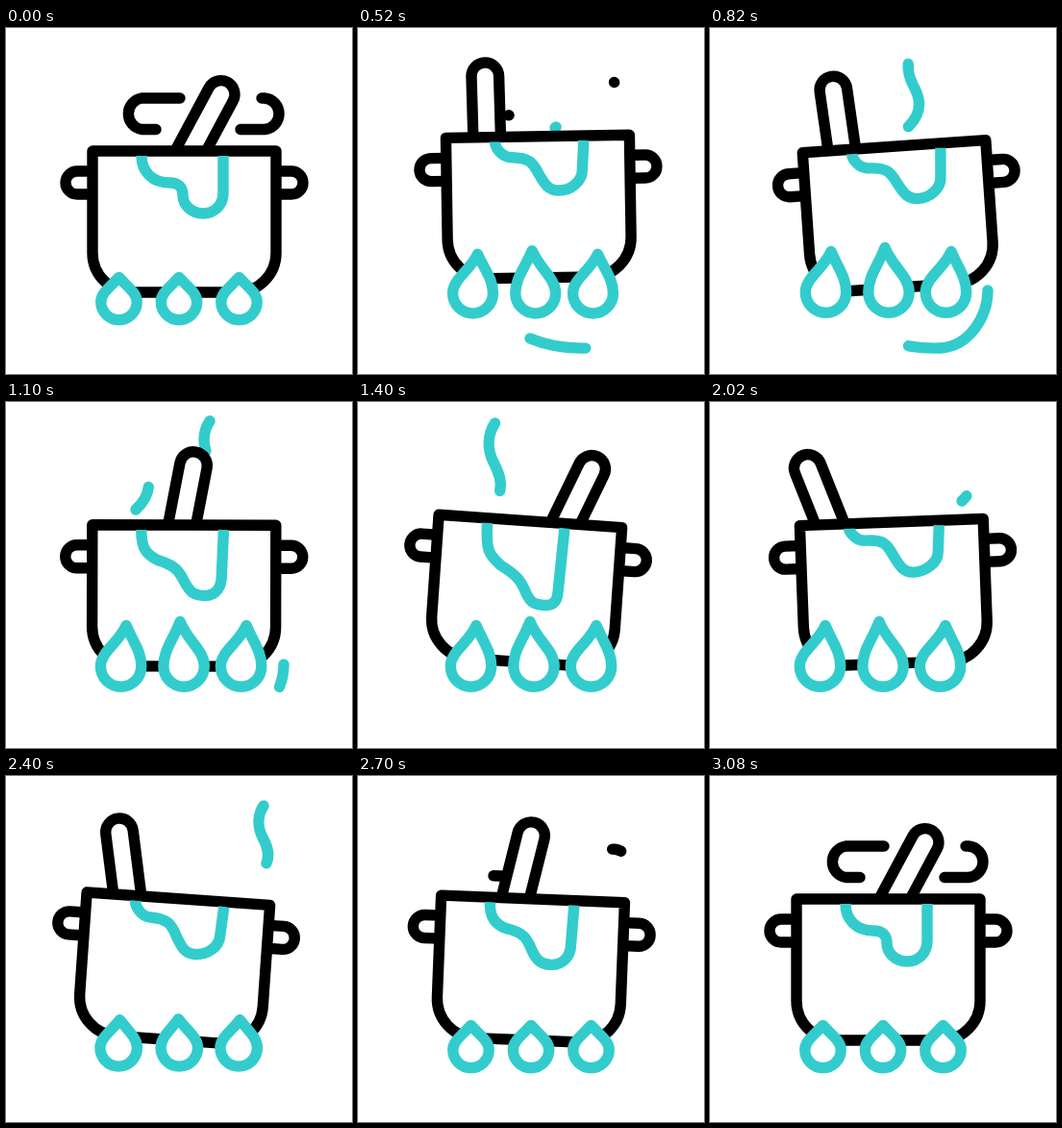
An HTML page for the animation above (3120 ms loop, 360 by 360 pixels).

```html
<!DOCTYPE html>
<html lang="en">
<head>
<meta charset="utf-8">
<title>Cooking pot</title>
<style>
  html, body { margin: 0; width: 100%; height: 100%; overflow: hidden; background: #fff; }
  svg { display: block; width: 100vw; height: 100vh; }
  path { fill: none; stroke: #000; stroke-width: 11.4; stroke-linejoin: round; stroke-linecap: round; }
  .teal { stroke: #33cccc; }
  .solid { fill: #fff; }
  #drip { stroke-linecap: butt; }
</style>
</head>
<body>
<svg viewBox="0 0 360 360">
  <g id="wisps"></g>
  <g id="pot">
    <path id="steamLeft" pathLength="100" d="M156 105.5H141a16.5 16.5 0 0 1 0-32.5H181"/>
    <path id="steamRight" pathLength="100" d="M266 73h3a16.3 16.3 0 0 1 0 32.5H244"/>
    <path id="spoon" class="solid"/>
    <path d="M90 149H74a12 12 0 0 0 0 24H90M281 149h16a12 12 0 0 1 0 24H281"/>
    <path class="solid" d="M90 128H281V234a41 41 0 0 1-41 41H131a41 41 0 0 1-41-41Z"/>
    <path id="drip" class="teal"/>
  </g>
  <g id="flames"></g>
</svg>
<script>
const LOOP = 3120;
const $ = id => document.getElementById(id);
const clamp = v => Math.min(1, Math.max(0, v));
const smooth = v => (v = clamp(v)) * v * (3 - 2 * v);
const ramp = (t, from, to) => smooth((t - from) / (to - from));

// Smooth swing through [time, value] turning points
const swing = (t, [first, ...rest]) => {
  let [time, value] = first;
  for (const [nextTime, nextValue] of rest) {
    value += (nextValue - value) * ramp(t, time, nextTime);
    if (t < nextTime) break;
    time = nextTime;
  }
  return value;
};

const TILT = [[400, 0], [790, -4], [1400, 4], [1820, -4.5], [2400, 4], [3060, 0]];
const SPOON_X = [[200, 192], [650, 118], [1420, 222], [2120, 116], [3060, 192]];
const SPOON_ANGLE = [[200, 28.2], [650, -8], [1420, 22], [2120, -22], [3060, 28.2]];

// Stretch 0..1 leaves the resting shape; sag lowers the shoulder and the drop
function dripPath(stretch, sag) {
  const sx = 170 - 12 * stretch, sy = 161 - 4 * stretch + .9 * sag;
  const slope = stretch * (3 + .3 * sag);
  const mx = 184 + 2 * stretch, my = 174 + 3 * stretch + 1.2 * sag;
  const bx = 205 + 2 * stretch, by = 193 + sag;
  const rx = 226 + stretch * (2 - .4 * sag), ry = by - 21;
  return `M141 133C141 ${sy - 11} ${sx - 17 + 6 * stretch} ${sy - slope} ${sx} ${sy}` +
    `C${sx + 10 + 8 * stretch} ${sy + slope} ${mx - 6 * stretch} ${my - 8 - 4 * stretch} ${mx} ${my}` +
    `C${mx + 6 * stretch} ${my + 11} ${bx - 11} ${by} ${bx} ${by}` +
    `C${bx + 12} ${by} ${rx} ${ry + 12} ${rx} ${ry}L${rx + 2 * stretch} 133`;
}

function flamePath(i, grow, sway) {
  const middle = i === 1;
  const r = 18.7 + 2.5 * grow, shoulder = 10 - 2.5 * grow;
  const bx = 117.5 + 62.5 * i + (sway + (middle ? 3 : 0)) * grow, by = 285 - 10 * grow;
  const ax = bx + (middle ? -4 : 5.5) * grow, ay = 259.5 - (middle ? 31 : 27) * grow;
  const h = by - ay, high = ay + .42 * h, low = by - .36 * h;
  return `M${ax} ${ay}C${ax - shoulder} ${high} ${bx - r} ${low} ${bx - r} ${by}` +
    `A${r} ${r} 0 0 0 ${bx + r} ${by}` +
    `C${bx + r} ${low} ${ax + shoulder} ${high} ${ax} ${ay}Z`;
}

const vapour = (x, y, size) => `M${x} ${y}c` +
  [16, -15, 11, -28, 5, -39, -6, -12, -5, -24, 1, -33].map(v => v * size).join(' ');

function addPath(parent, className, d = '') {
  const path = document.createElementNS('http://www.w3.org/2000/svg', 'path');
  path.setAttribute('class', className);
  path.setAttribute('d', d);
  path.setAttribute('pathLength', 100);
  return $(parent).appendChild(path);
}

function trim(path, start, end) {
  path.style.display = end > start ? '' : 'none';
  path.setAttribute('stroke-dasharray', `${(end - start) * 100} 300`);
  path.setAttribute('stroke-dashoffset', -start * 100);
}

const wisps = [
  [515, 700, vapour(205, 104, 1.17)],
  [1000, 650, vapour(135, 112, 1.25)],
  [1985, 710, vapour(262, 103, 1)],
  [340, 820, 'M179 323C196 330 218 334 240 333C270 331 289 300 289 273'],
  [1655, 350, 'M173 338C195 343 225 341 250 325']
].map(([start, length, d]) => ({ start, length, path: addPath('wisps', 'teal', d) }));

const flames = [0, 1, 2].map(() => addPath('flames', 'teal solid'));

function draw(t) {
  const busy = ramp(t, 200, 530) - ramp(t, 2600, 3060);
  const grow = ramp(t, 200, 600) - ramp(t, 2050, 2550);
  const lift = -17 * grow * Math.cos(Math.PI * (t - 540) / 1160) ** 4;
  const spoonX = swing(t, SPOON_X);

  $('pot').setAttribute('transform', `translate(0 ${lift}) rotate(${swing(t, TILT)} 186 40)`);
  $('spoon').setAttribute('transform', `translate(${spoonX} 128) rotate(${swing(t, SPOON_ANGLE)})`);
  $('spoon').setAttribute('d', `M-14.3 14V${4 * grow - 67}a14.3 14.3 0 0 1 28.6 0V14`);
  $('drip').setAttribute('d', dripPath(busy, busy * (spoonX - 158) / 3));

  trim($('steamLeft'), 0, 1 - busy);
  trim($('steamRight'), 0, 1 - busy);

  for (const { start, length, path } of wisps) {
    const p = (t - start) / length;
    trim(path, clamp((p - .4) / .6) ** 1.4, clamp(p / .55));
  }

  const sway = 3 * Math.sin(2 * Math.PI * (t - 200) / 2400);
  flames.forEach((path, i) => path.setAttribute('d', flamePath(i, grow, sway)));
}

const begin = performance.now();
function tick() {
  draw((performance.now() - begin) % LOOP);
  requestAnimationFrame(tick);
}
tick();
</script>
</body>
</html>
```
